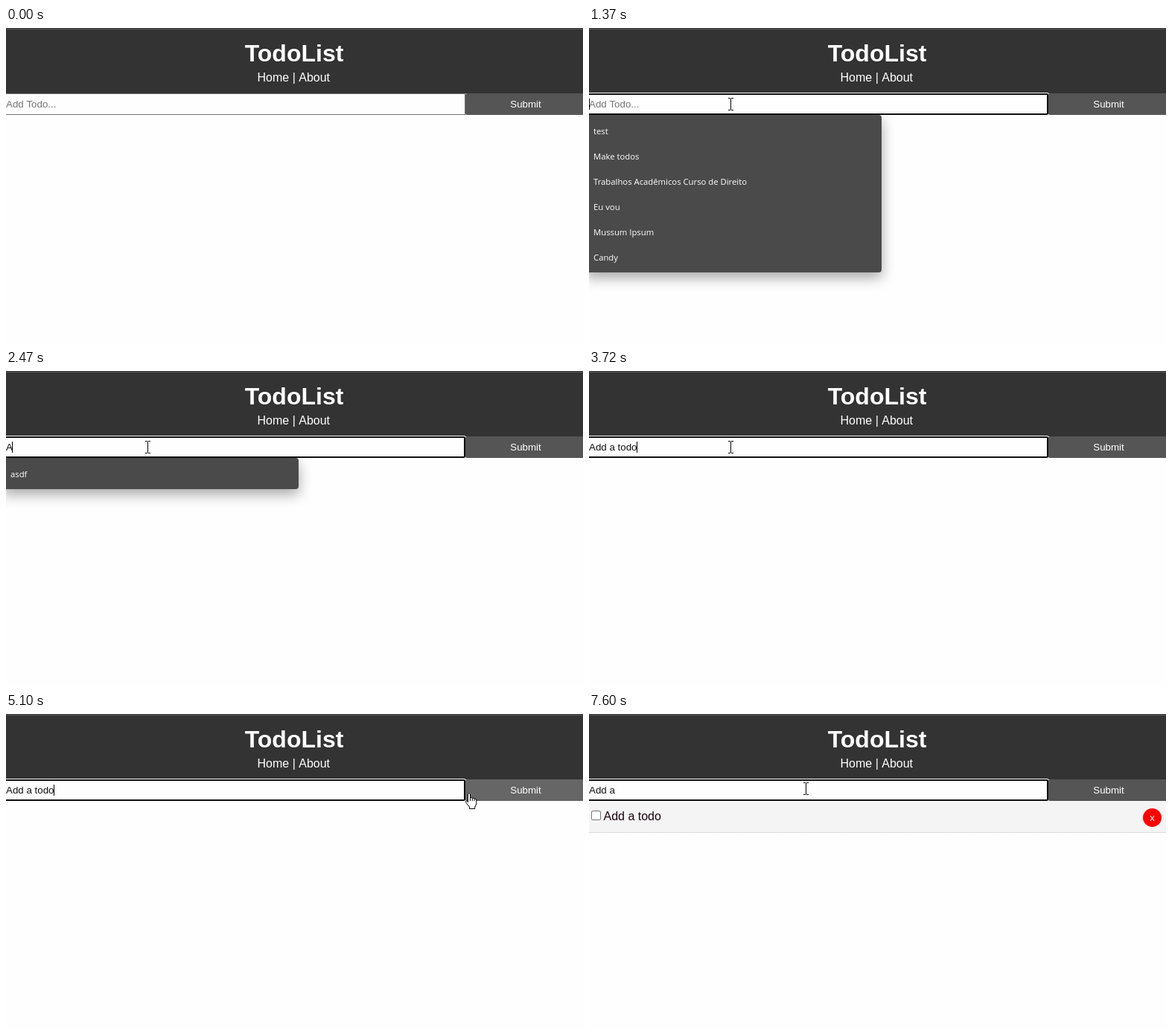
Recreate the animation shown at these times as an HTML page with a canvas. Size 775 by 424 pixels, loop 8 s.

```html
<!DOCTYPE html>
<html lang="en">
<head>
<meta charset="utf-8">
<title>TodoList</title>
<style>
  html, body { margin: 0; width: 100%; height: 100%; overflow: hidden; background: #fefefe; }
  canvas { display: block; }
</style>
</head>
<body>
<canvas id="stage" width="775" height="424"></canvas>
<script>
const ctx = document.getElementById('stage').getContext('2d');
const LOOP = 8000;
const SANS = '"Liberation Sans", Arial, sans-serif';
const SMALL = '13.333px ' + SANS;
const PAGE = '#fefefe';
const HISTORY = ['test', 'Make todos', 'Trabalhos Acadêmicos Curso de Direito',
  'Eu vou', 'Mussum Ipsum', 'Candy'];

// Each step changes only the listed parts of the state.
const STEPS = [
  [0, { text: '', focus: '', caret: false, menu: [], hover: false, item: false, pointer: null }],
  [450, { pointer: ['arrow', 262, 342] }],
  [600, { pointer: ['arrow', 240, 232] }],
  [760, { pointer: ['arrow', 214, 130] }],
  [910, { pointer: ['arrow', 198, 77] }],
  [1060, { pointer: ['beam', 190, 102] }],
  [1210, { focus: 'input', caret: true }],
  [1370, { menu: HISTORY }],
  [1840, { caret: false }],
  [2300, { caret: true }],
  [2470, { text: 'A', menu: ['asdf'] }],
  [2620, { text: 'Ad', menu: [] }],
  [2780, { text: 'Add' }],
  [2930, { text: 'Add a' }],
  [3090, { text: 'Add a ' }],
  [3400, { text: 'Add a t' }],
  [3560, { text: 'Add a to' }],
  [3720, { text: 'Add a todo' }],
  [4330, { pointer: ['beam', 225, 103] }],
  [4480, { pointer: ['beam', 330, 107] }],
  [4640, { pointer: ['arrow', 450, 124] }],
  [4790, { pointer: ['arrow', 545, 128] }],
  [4950, { pointer: ['arrow', 604, 121] }],
  [5100, { pointer: ['hand', 617, 106], hover: true }],
  [5240, { focus: 'button', caret: false }],
  [5410, { item: true }],
  [5560, { pointer: ['beam', 570, 106], hover: false }],
  [5720, { pointer: ['beam', 410, 102] }],
  [5880, { pointer: ['beam', 295, 100] }],
  [6040, { pointer: ['beam', 292, 100], focus: 'input', caret: true }],
  [6200, { pointer: ['beam', 291, 100] }],
  [6500, { caret: false }],
  [6960, { text: 'Add a tod', caret: true }],
  [7110, { text: 'Add a to' }],
  [7270, { text: 'Add a t' }],
  [7420, { text: 'Add a ' }],
  [7600, { caret: false }],
];

const ARROW = new Path2D('M.5 .5V16.5L4.2 13L6.8 18.8L9.3 17.7L6.8 12H11.8Z');
const HAND = new Path2D('M3.5 1.8Q5 -.6 6.5 1.8V7Q8 5.6 9.3 7.4Q10.9 6.3 12 8.2' +
  'Q14.4 7.4 14.8 10V15L12.8 19V21.5H5.5V19L.8 13.2Q-.2 11.2 1.5 10.8L3.5 12.8Z');
const KNUCKLES = new Path2D('M6.5 7V11M9.3 7.5V11M12 8.5V11');

function rect(x, y, w, h, color) {
  ctx.fillStyle = color;
  ctx.fillRect(x, y, w, h);
}

function rounded(x, y, w, h, r, color) {
  ctx.fillStyle = color;
  ctx.beginPath();
  ctx.roundRect(x, y, w, h, r);
  ctx.fill();
}

function label(text, x, y, font, color, align = 'left') {
  ctx.font = font;
  ctx.fillStyle = color;
  ctx.textAlign = align;
  ctx.fillText(text, x, y);
}

function drawHeader() {
  rect(0, 0, 775, 88, '#333');
  rect(0, 1, 775, 1, '#5a5a5a');
  label('TodoList', 387, 45, 'bold 32px ' + SANS, '#fff', 'center');
  label('Home | About', 386.3, 72, '16px ' + SANS, '#fff', 'center');
}

function drawInput({ text, focus, caret }) {
  if (focus === 'input') {
    rounded(-10, 87, 628, 31, 3, '#fff');
    rounded(-10, 88, 627, 29, 2, '#101010');
    rect(0, 90, 615, 25, PAGE);
  } else {
    rect(0, 88, 617, 29, '#767676');
    rect(0, 89, 616, 27, PAGE);
  }
  label(text || 'Add Todo...', 0, 107, SMALL, text ? '#111' : '#757575');
  if (caret) rect(Math.floor(ctx.measureText(text).width * (text ? 1 : 0)), 95, 1, 15, '#000');
}

function drawButton({ focus, hover }) {
  const fill = hover ? '#666' : '#555';
  if (focus === 'button') {
    rounded(615, 86, 180, 33, 4, '#fff');
    rounded(616, 87, 180, 31, 3, '#101010');
    rounded(618, 89, 180, 27, 1, fill);
  } else {
    rounded(617, 88, 180, 29, 2, fill);
  }
  label('Submit', 698, 107, SMALL, '#fff', 'center');
}

function drawItem() {
  rect(0, 117, 775, 42, '#f4f4f4');
  for (let x = 0; x < 775; x += 2) rect(x, 159, 1, 1, '#bbb');
  rounded(3, 130, 13, 13, 2.5, '#767676');
  rounded(4, 131, 11, 11, 1.5, '#fff');
  label('Add a todo', 19.5, 143, '16px ' + SANS, '#1c0410');
  rounded(744, 127, 25, 25, 12.5, '#f00');
  label('x', 756.5, 144, SMALL, '#fff', 'center');
}

function drawMenu(rows) {
  ctx.save();
  ctx.shadowColor = 'rgba(0,0,0,.35)';
  ctx.shadowBlur = 18;
  ctx.shadowOffsetY = 7;
  // Keep the shadow off the field above.
  ctx.beginPath();
  ctx.rect(0, 117, 775, 307);
  ctx.clip();
  rounded(-5, 117, 398, rows.length * 34 + 8, 4, '#4a4a4a');
  ctx.restore();
  rows.forEach((row, i) =>
    label(row, 6, 143 + i * 34, '11.3px "Open Sans", "Noto Sans", sans-serif', '#fff'));
}

function drawPointer([kind, x, y]) {
  ctx.save();
  ctx.translate(x, y);
  if (kind === 'beam') {
    rect(0, -7, 1, 15, '#000');
    for (const end of [-8, 8]) {
      rect(-3, end, 3, 1, '#000');
      rect(1, end, 3, 1, '#000');
    }
  } else {
    const shape = kind === 'hand' ? HAND : ARROW;
    ctx.fillStyle = '#fff';
    ctx.strokeStyle = '#000';
    ctx.lineWidth = 1;
    ctx.fill(shape);
    ctx.stroke(shape);
    if (kind === 'hand') ctx.stroke(KNUCKLES);
  }
  ctx.restore();
}

function draw() {
  const time = performance.now() % LOOP;
  const state = Object.assign({}, ...STEPS.filter(([at]) => at <= time).map(([, change]) => change));
  rect(0, 0, 775, 424, PAGE);
  drawHeader();
  if (state.item) drawItem();
  drawInput(state);
  drawButton(state);
  if (state.menu.length) drawMenu(state.menu);
  if (state.pointer) drawPointer(state.pointer);
  requestAnimationFrame(draw);
}
draw();
</script>
</body>
</html>
```
